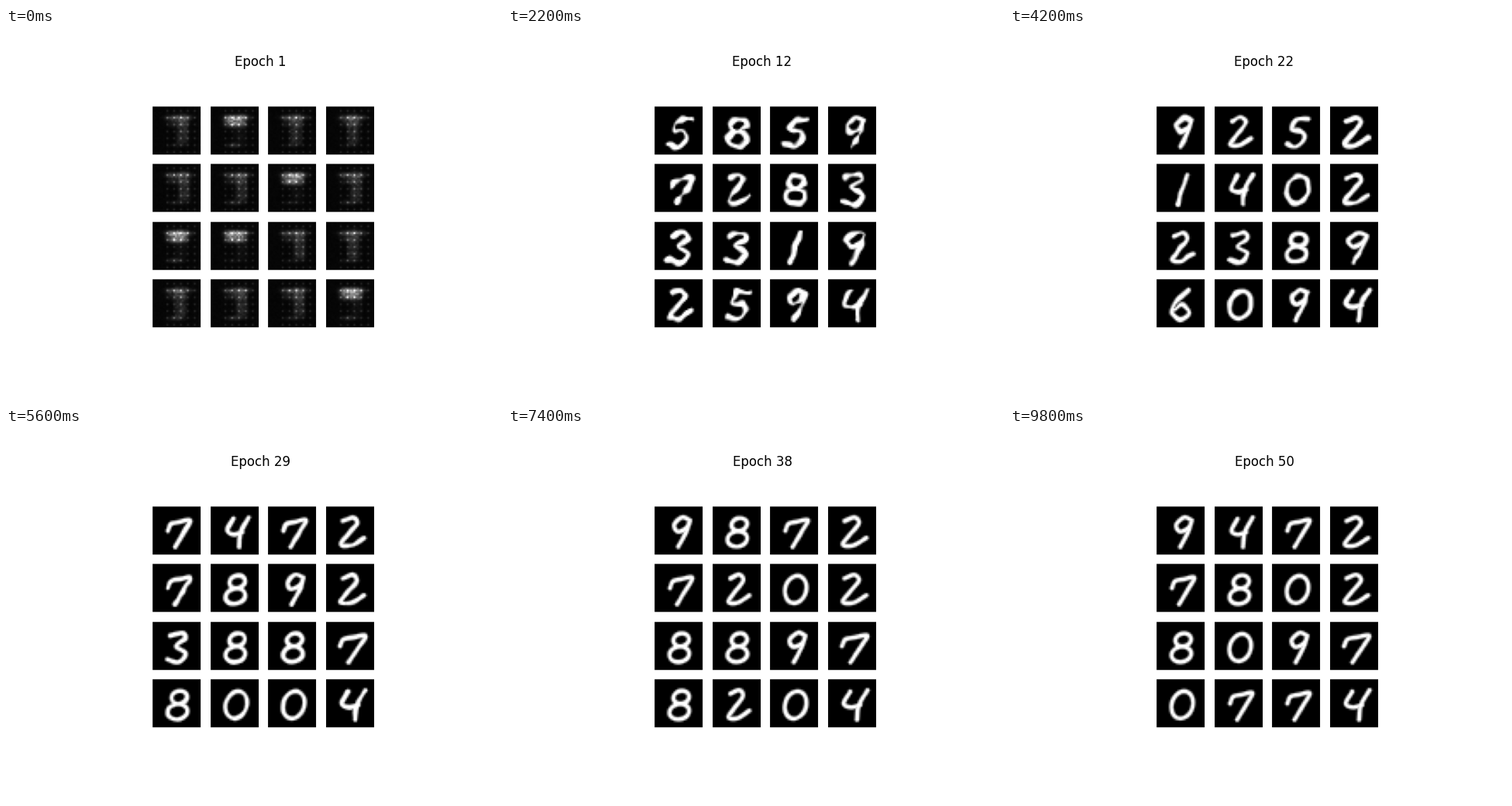
These frames come from a looping animation (640 px wide and 480 px high, 10 s). A matplotlib script:

```python
import numpy as np
import matplotlib.pyplot as plt
from matplotlib.animation import FuncAnimation

EPOCHS = 50
SIDE, BOX = 28, 62          # cells per tile, drawing units per tile
TILE, PAGE = 67, 400        # tile and sheet size in pixels
PITCH, LEFT, TOP = 80.6, 50, 48
BRIGHT = {1, 6, 8, 9, 15}   # tiles that glow in the first epoch

# Which digit each tile leans towards at a few epochs
STAGES = {6: "4869904088530594", 12: "5859728333192594", 22: "9252140223896094",
          29: "7472789238878004", 38: "9872720288978204", 50: "9472780280970774"}
MARKS = sorted(STAGES)

axis = (np.arange(SIDE) + 0.5) * BOX / SIDE
GX, GY = np.meshgrid(axis, axis)


def arc(cx, cy, rx, ry):
    a = np.linspace(0, 2 * np.pi, 60)
    return np.column_stack([cx + rx * np.cos(a), cy + ry * np.sin(a)])


def curve(*points):
    """Smooth path through a few points (Catmull-Rom)."""
    p = np.array(points, float)
    p = np.vstack([2 * p[0] - p[1], p, 2 * p[-1] - p[-2]])
    t = np.linspace(0, 1, 14)[:, None]
    parts = []
    for a, b, c, d in zip(p, p[1:], p[2:], p[3:]):
        parts.append(b + 0.5 * t * (c - a + t * (2 * a - 5 * b + 4 * c - d
                                                 + t * (3 * (b - c) + d - a))))
    return np.vstack(parts)


DIGITS = {
    "0": [arc(.5, .5, .46, .46)],
    "1": [curve((.65, 0), (.5, .5), (.4, 1))],
    "2": [curve((.1, .12), (.45, 0), (.65, .2), (.35, .6), (.15, .92), (.55, .95), (1, .7))],
    "3": [curve((.1, .1), (.6, 0), (.75, .2), (.4, .45), (.85, .7), (.6, 1), (.1, .9))],
    "4": [curve((.3, .05), (.12, .45), (.4, .58), (.75, .5)),
          curve((.95, 0), (.7, .5), (.7, 1))],
    "5": [curve((.9, .05), (.4, .08), (.25, .4), (.7, .5), (.8, .75), (.5, 1), (.1, .9))],
    "6": [curve((.7, 0), (.2, .4), (.1, .75), (.5, 1), (.85, .75), (.5, .5), (.2, .65))],
    "7": [curve((.05, .45), (.15, .22), (.5, .15), (.95, .1), (.75, .5), (.45, 1))],
    "8": [arc(.5, .24, .33, .22), arc(.5, .73, .42, .26)],
    "9": [curve((.85, .1), (.5, 0), (.2, .25), (.4, .48), (.75, .35), (.85, .1)),
          curve((.85, .1), (.75, .5), (.5, 1))],
}


def ripple(rng):
    """Smooth random field of about unit size."""
    out = np.zeros((SIDE, SIDE))
    for _ in range(5):
        kx, ky = rng.uniform(-0.35, 0.35, 2)
        out += np.sin(kx * GX + ky * GY + rng.uniform(0, 2 * np.pi))
    return out / 2


def rough(epoch):
    """Early epochs are thick and broken, later ones clean."""
    return np.exp(-(epoch - 6) / 13)


def digit_field(epoch, cell):
    """Distance of every cell of a tile from its digit's outline."""
    rng = np.random.default_rng(1000 * epoch + cell)
    wild = rough(epoch)
    path = np.vstack(DIGITS[STAGES[epoch][cell]])
    half = 17 if cell % 4 == 3 else 15
    x = 33 + 2 * half * (path[:, 0] - 0.5) - 5 * (path[:, 1] - 0.5)
    y = 33 + 38 * (path[:, 1] - 0.5)
    gx = GX + 1.5 * wild * ripple(rng)
    gy = GY + 1.5 * wild * ripple(rng)
    near = np.hypot(gx[..., None] - x, gy[..., None] - y).min(axis=2)
    return np.minimum(near, 14) - 2.8 - 0.6 * wild + 1.6 * wild * ripple(rng)


fields = {m: [digit_field(m, c) for c in range(16)] for m in MARKS}


def first_tile(cell):
    """Lattice of dots under a soft envelope."""
    rng = np.random.default_rng(cell)
    y, x = np.mgrid[:SIDE, :SIDE].astype(float)
    dots = (np.cos(np.pi * x / 4) * np.cos(np.pi * (y - 2) / 4)) ** 6
    glow, column = (0.75, 0.06) if cell in BRIGHT else (0.15, 0.22)
    streak = 0.3 * np.exp(-((y - 6) / 1.4) ** 2 - ((x - 15) / 8) ** 4)
    top = glow * np.exp(-((x - 14) / 6) ** 4 - ((y - 8) / 3.5) ** 4)
    column = column * np.exp(-((x - rng.uniform(15, 18)) / 3.5) ** 4 - ((y - 13) / 9) ** 6)
    foot = rng.uniform(0, 0.25) * np.exp(-((x - 13) / 4) ** 2 - ((y - 22) / 1.3) ** 2)
    grain = rng.uniform(0.5, 1, x.shape)
    image = (streak + top + column + foot) * (0.75 * grain + 0.8 * dots)
    return np.clip(image + 0.03 * grain + 0.12 * dots * (x > 7), 0, 1)


def tile(epoch, cell):
    if epoch == 1:
        return first_tile(cell)
    a = max((m for m in MARKS if m <= epoch), default=MARKS[0])
    b = min(m for m in MARKS if m >= epoch)
    t = (epoch - a) / (b - a) if b > a else 0
    old, new = fields[a][cell], fields[b][cell]
    dist = np.minimum((1 - t) * old + t * new,
                      np.minimum(old + 5 * t, new + 5 * (1 - t)))
    rng = np.random.default_rng(100 * epoch + cell)
    dist = dist + 1.2 * np.sin(np.pi * t) * ripple(rng)
    u = min(1, (epoch - 1) / 5) ** 0.7
    return (1 - u) * first_tile(cell) + u * np.clip(0.5 - dist / 2.6, 0, 1)


# Hanning resampling of the cells to tile pixels
pos = (np.arange(TILE) + 0.5) * SIDE / TILE - 0.5
gap = np.clip(np.abs(pos[:, None] - np.arange(SIDE)), 0, 1)
WEIGHT = 0.5 + 0.5 * np.cos(np.pi * gap)
WEIGHT /= WEIGHT.sum(axis=1, keepdims=True)


def sheet(epoch):
    page = np.ones((PAGE, PAGE))
    for cell in range(16):
        row, col = divmod(cell, 4)
        y, x = int(TOP + PITCH * row), int(LEFT + PITCH * col + 0.5)
        page[y:y + TILE, x:x + TILE] = WEIGHT @ tile(epoch, cell) @ WEIGHT.T
    return page


fig, ax = plt.subplots(figsize=(6.4, 4.8), dpi=100)
ax.axis("off")
picture = ax.imshow(sheet(1), cmap="gray", vmin=0, vmax=1)
title = ax.set_title("Epoch 1")


def update(i):
    picture.set_data(sheet(i + 1))
    title.set_text(f"Epoch {i + 1}")
    return picture, title


anim = FuncAnimation(fig, update, frames=EPOCHS, interval=200, repeat=True, repeat_delay=0)
plt.show()
```
